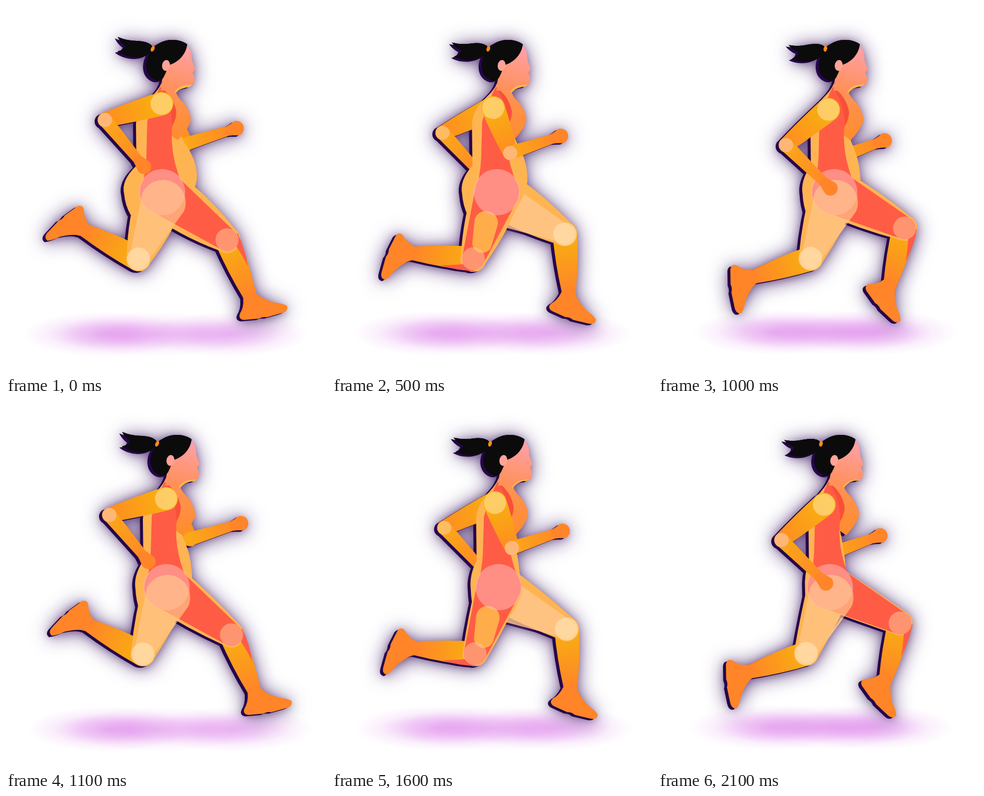
Recreate the animation shown at these times as an HTML page with a canvas. Size 650 px wide and 747 px high, loop 2.2 s.

```html
<!DOCTYPE html>
<html lang="en">
<head>
<meta charset="utf-8">
<title>Runner</title>
<style>
  html, body { margin: 0; width: 100%; height: 100%; overflow: hidden; background: #fff; }
  canvas { display: block; width: 650px; height: 747px; }
</style>
</head>
<body>
<canvas id="stage" width="650" height="747"></canvas>
<script>
const STEP = 100, FRAMES = 22, CYCLE = 11, HALF = 5.5, HIP_Y = 379;
const stage = document.getElementById('stage').getContext('2d');
const figure = document.createElement('canvas');
figure.width = 650;
figure.height = 747;
const g = figure.getContext('2d');

const TAN = '#ffb452', RED = '#ff5c46', YELLOW = '#f8b010', ORANGE = '#ff8528', BEIGE = '#ffc78e';

// phase, knee x y, ankle x y (from the hip), foot angle
const LEG = [
  [0, 132, 97, 178, 210, 20],
  [1.5, 63, 117, 125, 225, 16],
  [2, 44, 131, 72, 235, 12],
  [4.5, -48, 135, -162, 172, 114],
  [5.5, -48, 136, -157, 78, 169],
  [7, -45, 155, -142, 69, 190],
  [7.5, 2, 128, -100, 142, 142],
  [10, 143, 73, 114, 185, 79]
];
// phase, elbow x y, hand x y (from the hip)
const ARM = [
  [0, -116, -147, -37, -52],
  [1.5, -102, -144, -62, -36],
  [2, -78, -91, 22, -18],
  [4.5, 0, -68, 102, -105],
  [5.5, 48, -98, 151, -130],
  [7, 59, -89, 150, -174],
  [7.5, -4, -68, 107, -80],
  [10, -98, -96, -8, -8]
];
// phase, ear x, shoulder x y (from the hip), ground y, ponytail angle
const BODY = [
  [0, 8, -1, -180, 668, 0],
  [2, 14, -3, -170, 682, 0],
  [4.5, 10, -12, -168, 664, -8],
  [5.5, 9, -3, -175, 668, -10],
  [7, 11, -4, -168, 683, -13],
  [10, 9, -12, -168, 664, -13]
];
// frame, hip x
const HIP = [[0, 317], [2, 328], [4.5, 352], [5.5, 318], [7, 324], [10, 358], [11, 326],
  [13, 334], [15.5, 356], [16.5, 321], [18, 329], [21, 349]];

const lerp = (a, b, u) => a + (b - a) * u;
const clamp = v => Math.max(0, Math.min(1, v));
const add = (p, x, y) => [p[0] + x, p[1] + y];

function span(keys, t, period) {
  t %= period;
  let i = keys.length - 1;
  while (keys[i][0] > t) i--;
  const a = keys[i], b = keys[(i + 1) % keys.length];
  const end = i + 1 < keys.length ? b[0] : period;
  return [a, b, (t - a[0]) / (end - a[0])];
}

function mix(keys, t, period) {
  const [a, b, u] = span(keys, t, period);
  return a.map((v, i) => lerp(v, b[i], u));
}

// Turns one bone into the next by angle and length
function swing(v, w, u) {
  const a = Math.atan2(v[1], v[0]);
  let d = Math.atan2(w[1], w[0]) - a;
  d -= 2 * Math.PI * Math.round(d / (2 * Math.PI));
  const r = lerp(Math.hypot(...v), Math.hypot(...w), u);
  return [r * Math.cos(a + d * u), r * Math.sin(a + d * u)];
}

function chain(keys, t, hip, root) {
  const [a, b, u] = span(keys, t, CYCLE);
  const first = k => [k[1] - root[0], k[2] - root[1]];
  const second = k => [k[3] - k[1], k[4] - k[2]];
  const mid = add(add(hip, ...root), ...swing(first(a), first(b), u));
  return { mid, end: add(mid, ...swing(second(a), second(b), u)), turn: lerp(a[5], b[5], u) };
}

function grad(p, q, from, to) {
  const paint = g.createLinearGradient(p[0], p[1], q[0], q[1]);
  paint.addColorStop(0, from);
  paint.addColorStop(1, to);
  return paint;
}

function dot(p, r, fill) {
  g.fillStyle = fill;
  g.beginPath();
  g.arc(p[0], p[1], r, 0, 7);
  g.fill();
}

function shape(d, fill) {
  g.fillStyle = fill;
  g.fill(new Path2D(d));
}

// Tapered limb with round ends and swelling sides
function limb(p, q, r1, r2, fill, bulge = 0) {
  const a = Math.atan2(q[1] - p[1], q[0] - p[0]);
  const nx = -Math.sin(a), ny = Math.cos(a), r = (r1 + r2) / 2 + bulge;
  const mx = (p[0] + q[0]) / 2, my = (p[1] + q[1]) / 2;
  g.fillStyle = fill;
  g.beginPath();
  g.arc(p[0], p[1], r1, a + Math.PI / 2, a - Math.PI / 2);
  g.quadraticCurveTo(mx - nx * r, my - ny * r, q[0] - nx * r2, q[1] - ny * r2);
  g.arc(q[0], q[1], r2, a - Math.PI / 2, a + Math.PI / 2);
  g.quadraticCurveTo(mx + nx * r, my + ny * r, p[0] + nx * r1, p[1] + ny * r1);
  g.fill();
}

function shin(leg) {
  const { mid, end, turn } = leg;
  limb(mid, end, 25, 14, grad(mid, end, YELLOW, ORANGE), 4);
  g.save();
  g.translate(...end);
  g.rotate(turn * Math.PI / 180);
  shape('M-14 3Q-4 20-5 35Q-9 54 6 51L34 38Q40 31 48 30L73 12Q86 3 78-6Q66-7 52-3Q30-2 17-6Q0-16-14 3Z', ORANGE);
  g.restore();
}

function arm(shoulder, a) {
  limb(shoulder, a.mid, 24, 15, grad(shoulder, a.mid, YELLOW, '#ff8c22'), 2);
  limb(a.mid, a.end, 14, 9, grad(a.mid, a.end, '#fba818', ORANGE));
  const w = [lerp(a.mid[0], a.end[0], .88), lerp(a.mid[1], a.end[1], .88)];
  limb(w, a.end, 11, 15, ORANGE);
}

function torso(x, dx, fat) {
  const back = x - 43 - 10 * fat, belly = x + 30 + 40 * fat;
  shape(`M${315 + dx} 158C${305 + dx} 185 ${back + 4} 195 ${back} 240L${back + 1} 325
    Q${x - 51 - 33 * fat} 355 ${x - 49 - 28 * fat} 383Q${x - 49 - 26 * fat} 405 ${x - 46 - 18 * fat} 425
    L${x + 30} 430L${x + 46 + 8 * fat} 390Q${belly + 4} 365 ${belly} 338
    Q${belly - 2} 310 ${x + 22 + 22 * fat} 276L${x + 10} 200Z`, TAN);
}

function chest(dx) {
  shape(`M${318 + dx} 145L${350 + dx} 150L${344 + dx} 172Q${346 + dx} 184 ${362 + dx} 198
    Q${378 + dx} 222 ${374 + dx} 237Q${366 + dx} 256 ${349 + dx} 273Q${330 + dx} 262 ${312 + dx} 235
    L${305 + dx} 178Q${316 + dx} 166 ${318 + dx} 145Z`,
    grad([340 + dx, 150], [355 + dx, 270], '#ff9460', '#ff8c2c'));
}

function redTorso(x, dx) {
  shape(`M${313 + dx} 165Q${340 + dx} 185 ${344 + dx} 215L${x + 20} 250Q${x + 16} 310 ${x + 46} 375
    L${x - 46} 385Q${x - 34} 350 ${x - 32} 310L${x - 30} 235Q${300 + dx} 190 ${313 + dx} 165Z`, RED);
  shape(`M${313 + dx} 165Q${340 + dx} 183 ${346 + dx} 215Q${346 + dx} 232 ${337 + dx} 245
    Q${338 + dx} 200 ${313 + dx} 165Z`, '#f85038');
}

function redTail(leg) {
  const [kx, ky] = leg.mid;
  const vx = leg.end[0] - kx, vy = leg.end[1] - ky, n = Math.hypot(vx, vy);
  g.save();
  g.translate(kx, ky);
  g.transform(vy / n, -vx / n, vx / n, vy / n, 0, 0);
  shape('M8 0L25-4Q26 35 19 66Q16 30 8 0Z', RED);
  g.restore();
}

function head(dx, fat, pony) {
  g.save();
  g.translate(dx, 0);
  shape(`M340 160L379 156Q378 ${163 + 2 * fat} 366 ${162 + 4 * fat}Q350 ${166 + 3 * fat} 344 178Z`, '#ffb84c');
  shape(`M322 122L340 112Q360 100 366 79Q376 87 377 104Q377 112 384 128Q382 133 379 135L382 143
    Q385 160 376 160Q352 160 344 173L314 172Q322 150 322 122Z`,
    grad([360, 85], [340, 172], '#ffa0a6', '#ff9058'));
  shape(`M368 78C350 65 320 66 303 82C284 98 276 131 296 147Q307 155 316 151Q327 136 328 121
    C350 116 366 98 368 78Z`, '#0b0b0c');
  g.fillStyle = '#ffa397';
  g.beginPath();
  g.ellipse(325, 121, 8, 11, .15, 0, 7);
  g.fill();
  g.translate(298, 87);
  g.rotate(pony * Math.PI / 180);
  shape('M-71-24Q-52-16-32-16Q-6-15 0-3L-4 2Q-8 18-34 18Q-56 17-71 5Q-58 3-55-5Q-65-12-71-24Z', '#0b0b0c');
  g.fillStyle = '#ff8c10';
  g.beginPath();
  g.ellipse(0, 0, 3.6, 6, .45, 0, 7);
  g.fill();
  g.restore();
}

function ground(x, y, rx, alpha) {
  stage.save();
  stage.translate(x, y);
  stage.scale(rx, 46);
  const paint = stage.createRadialGradient(0, 0, 0, 0, 0, 1);
  [[0, 1], [.35, .7], [.7, .22], [1, 0]].forEach(([at, k]) =>
    paint.addColorStop(at, `rgba(190,20,215,${alpha * k})`));
  stage.fillStyle = paint;
  stage.fillRect(-1, -1, 2, 2);
  stage.restore();
}

function draw(frame) {
  const phase = frame % CYCLE, fat = 1 - frame / FRAMES;
  const [, x] = mix(HIP, frame, FRAMES);
  const [, ear, sx, sy, floor, pony] = mix(BODY, phase, CYCLE);
  const hip = [x, HIP_Y], dx = x + ear - 325, shoulder = add(hip, sx, sy);
  const near = chain(LEG, phase, hip, [0, 0]), far = chain(LEG, phase + HALF, hip, [0, 0]);
  const nearArm = chain(ARM, phase, hip, [sx, sy]), farArm = chain(ARM, phase + HALF, hip, [sx, sy]);
  const lift = clamp((near.mid[0] - far.mid[0] - 60) / 80);
  const thigh = alpha => {
    g.globalAlpha = alpha;
    limb(add(hip, 2, 21), far.mid, 46, 19, BEIGE);
    g.globalAlpha = 1;
  };

  g.clearRect(0, 0, 650, 747);
  arm(shoulder, farArm);
  shin(far);
  limb(hip, far.mid, 45 + 5 * fat, 25, TAN, 2 + 9 * fat);
  if (lift < 1) thigh(.8);
  shin(near);
  torso(x, dx, fat);
  limb(hip, near.mid, 45 + 5 * fat, 25 + 2 * fat, TAN, 1 + 11 * fat);
  chest(dx);
  redTorso(x, dx);
  redTail(near);
  limb(hip, near.mid, 45, 23, RED);

  const rear = clamp((x - near.mid[0]) / 40);
  if (rear) {
    g.globalAlpha = rear;
    limb(add(hip, -22, 62), add(near.mid, 18, -32), 24, 20, '#ffac4a');
    g.globalAlpha = 1;
  }
  dot(hip, 47, 'rgba(255,184,184,.55)');
  if (lift) thigh(lift * .68);
  dot(far.mid, 23.5, 'rgba(255,226,176,.7)');
  dot(near.mid, 23.5, 'rgba(255,196,150,.55)');
  if (phase > 1 && phase < 9) dot(farArm.mid, 14, 'rgba(255,205,160,.55)');
  head(dx, fat, pony);
  arm(shoulder, nearArm);
  dot(shoulder, 22.5, 'rgba(255,216,136,.72)');
  dot(nearArm.mid, 14.5, 'rgba(255,190,160,.7)');

  stage.clearRect(0, 0, 650, 747);
  [near, far].forEach(leg => ground(lerp(x, leg.end[0], .75), floor, 165, .3));
  ground(x - 15, floor, 190, .24 * clamp((683 - floor) / 15));
  const cast = (color, blur, left, down) => {
    stage.shadowColor = color;
    stage.shadowBlur = blur;
    stage.shadowOffsetX = left;
    stage.shadowOffsetY = down;
    stage.drawImage(figure, 0, 0);
  };
  cast('rgba(45,5,85,.75)', 42, -2, 3);
  cast('rgba(35,0,75,.4)', 16, -3, 3);
  cast('#25064a', 1, -6, 3);
  stage.shadowColor = 'transparent';
}

let shown = -1;
const start = performance.now();
function tick() {
  const frame = Math.floor((performance.now() - start) / STEP) % FRAMES;
  if (frame !== shown) draw(shown = frame);
  requestAnimationFrame(tick);
}
tick();
</script>
</body>
</html>
```
